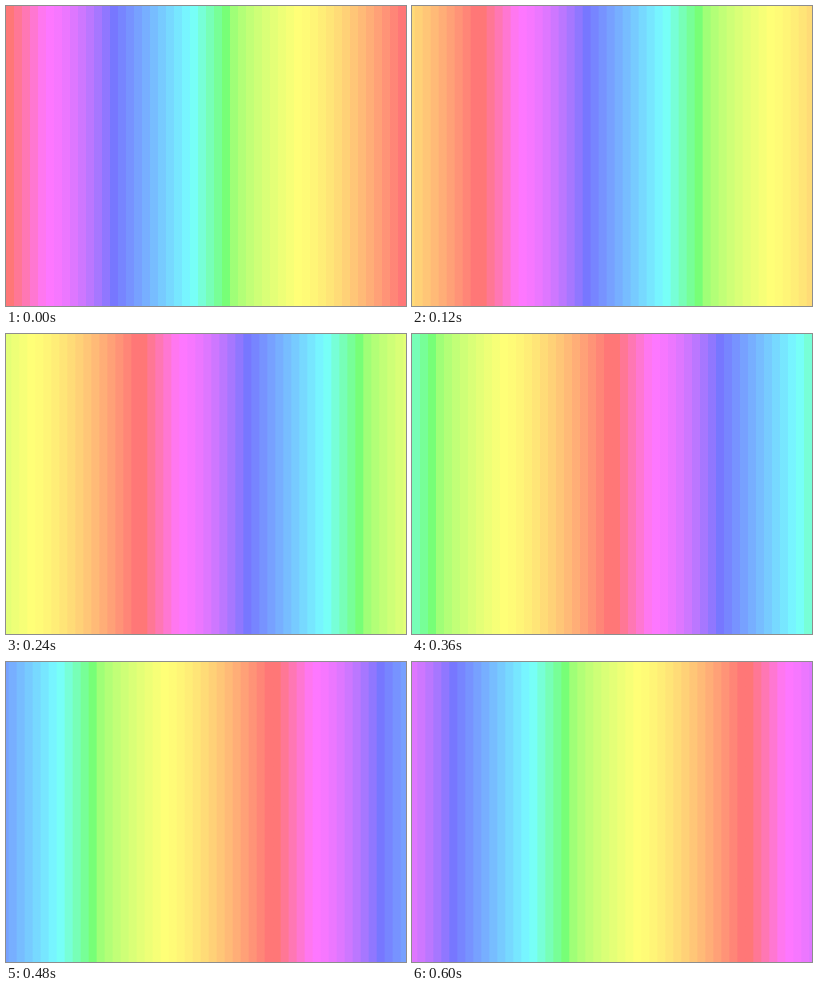
Write an HTML page that moves like this. It is 400x300 px and loops after 0.66 s.

```html
<!DOCTYPE html>
<html lang="en">
<head>
<meta charset="utf-8">
<title>Rainbow bands</title>
<style>
  html, body { margin: 0; width: 100%; height: 100%; overflow: hidden; }
  #rainbow {
    width: 400px;
    height: 300px;
    background-size: 400px 300px;
    background-repeat: repeat-x;
    animation: slide 660ms steps(11, end) infinite;
  }
  /* 11 of 12 twelfths: the loop restarts with a double step */
  @keyframes slide {
    from { background-position: 0 0; }
    to { background-position: 366.667px 0; }
  }
</style>
</head>
<body>
<div id="rainbow"></div>
<script>
  const WIDTH = 400, BAND = 8;

  // Where each pure hue sits, and the easing power towards the next one
  const keys = [
    { x: 4, power: 1 },      // red
    { x: 40, power: 1.6 },   // magenta
    { x: 108, power: 1 },    // blue
    { x: 186, power: 1 },    // cyan
    { x: 220, power: 0.55 }, // green
    { x: 292, power: 1.4 },  // yellow
    { x: 396 }               // red again
  ];

  function hueAt(x) {
    const i = Math.max(1, keys.findIndex(k => k.x >= x));
    const from = keys[i - 1], to = keys[i];
    const t = (x - from.x) / (to.x - from.x);
    return 360 - 60 * (i - 1 + t ** from.power);
  }

  const bands = [];
  for (let x = 0; x < WIDTH; x += BAND) {
    const hue = hueAt(x + BAND / 2).toFixed(1);
    bands.push(`hsl(${hue}, 100%, 73.33%) ${x}px ${x + BAND}px`);
  }
  document.getElementById('rainbow').style.backgroundImage =
    `linear-gradient(to right, ${bands.join(', ')})`;
</script>
</body>
</html>
```
